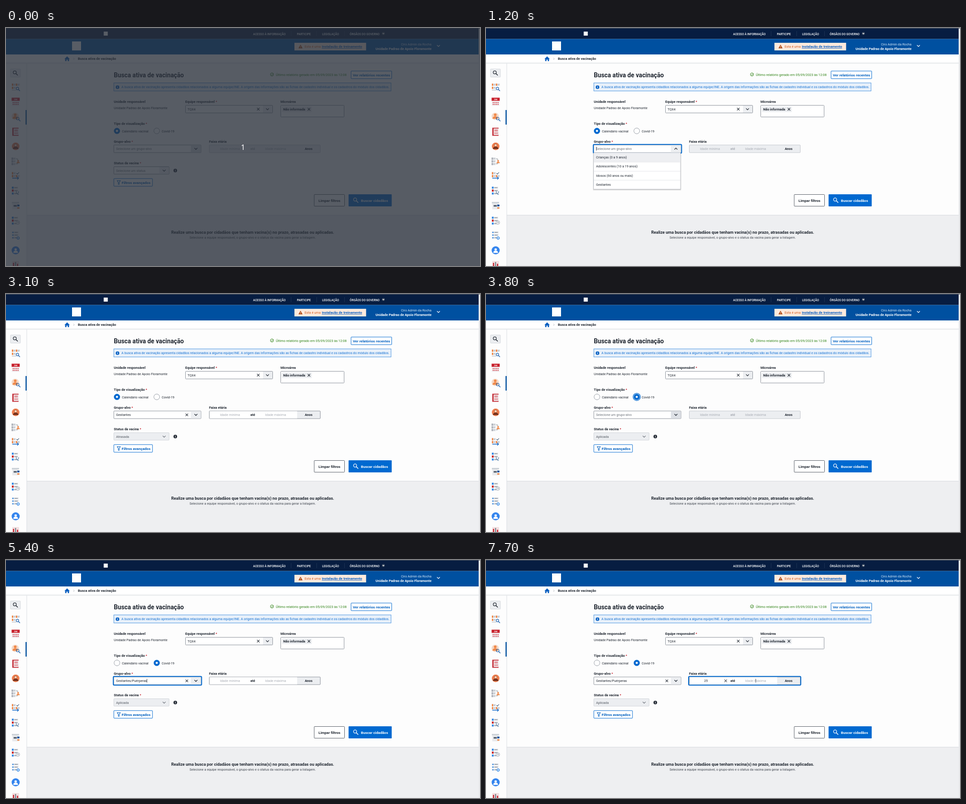
Animation of 1055 by 531 pixels, one loop 8000 ms. Source, as an HTML page:

```html
<!DOCTYPE html>
<html lang="pt-BR">
<head>
<meta charset="utf-8">
<title>Busca ativa</title>
<style>
html, body { margin: 0; width: 100%; height: 100%; overflow: hidden; background: #fdfdfd; }
svg { display: block; width: 1055px; height: 531px; }
text { font-family: Roboto, "Noto Sans", sans-serif; white-space: pre; }
</style>
</head>
<body>
<svg viewBox="0 0 1055 531"><g id="page"></g><g id="form"></g><g id="cover"></g></svg>
<script>
const BLUE = '#0069d0', INK = '#1f2630', GREY = '#6b7179', PALE = '#a9adb5', OFF = '#eceef1', RED = '#c8202c';
const SKIN = '#f08a4b', SKY = '#3d8fe6', LINE = '#b9bec6';

const rect = (x, y, w, h, fill, more = '') =>
  `<rect x="${x}" y="${y}" width="${w}" height="${h}" fill="${fill}" ${more}/>`;
const box = (x, y, w, h, fill, stroke, rx = 1, sw = 1) =>
  rect(x, y, w, h, fill, `stroke="${stroke}" stroke-width="${sw}" rx="${rx}"`);
const disc = (x, y, r, fill, more = '') => `<circle cx="${x}" cy="${y}" r="${r}" fill="${fill}" ${more}/>`;
const path = (d, stroke, w = 1, fill = 'none') =>
  `<path d="${d}" fill="${fill}" stroke="${stroke}" stroke-width="${w}"/>`;

// y is the middle of the capitals
const text = (x, y, s, { size = 7.25, color = INK, bold, anchor = 'start', more = '' } = {}) =>
  `<text x="${x}" y="${y + size * 0.36}" font-size="${size}" fill="${color}" font-weight="${bold ? 700 : 400}" text-anchor="${anchor}" ${more}>${s}</text>`;
const label = (x, y, s, required) =>
  text(x, y, s + (required ? ` <tspan fill="${RED}">*</tspan>` : ''), { size: 7.5, bold: true });
const button = (x, y, s, color) => text(x, y, s, { size: 8.1, bold: true, color });

const chevron = (x, y, color = INK, up = false, r = 3.2) => {
  const d = up ? -r / 2 : r / 2;
  return path(`M${x - r} ${y - d}L${x} ${y + d}L${x + r} ${y - d}`, color, 1.3);
};
const cross = (x, y, color = INK, r = 2.8) =>
  path(`M${x - r} ${y - r}l${2 * r} ${2 * r}m0 ${-2 * r}l${-2 * r} ${2 * r}`, color, 1.1);
const lens = (x, y, r, color, w = 1.2) =>
  disc(x, y, r, 'none', `stroke="${color}" stroke-width="${w}"`) +
  path(`M${x + r * .7} ${y + r * .7}l${r * 1.3} ${r * 1.3}`, color, w * 1.2);
const info = (x, y, color) => disc(x, y, 4, color) +
  rect(x - .6, y - .7, 1.2, 3, '#fff') + disc(x, y - 2, .7, '#fff');
const person = (x, y, r, color) => disc(x, y - r * .35, r * .38, color) +
  `<path d="M${x - r * .75} ${y + r * .75}q0 ${-r * .7} ${r * .75} ${-r * .7}t${r * .75} ${r * .7}z" fill="${color}"/>`;
const card = (x, y, color) => rect(x, y, 9, 5, '#e3e6ea') + rect(x, y, 3, 5, color) +
  rect(x + 4, y + 1.2, 4, .8, PALE) + rect(x + 4, y + 3, 3, .8, PALE);
const stack = (y, colors) => colors.map((c, i) =>
  rect(13, y - 9 + i * 6.5, 14, 4.5, '#e3e6ea') + rect(13, y - 9 + i * 6.5, 4, 4.5, c) +
  rect(18.5, y - 7.2 + i * 6.5, 7, 1, GREY)).join('');

function sidebar() {
  let s = box(10, 91.5, 22, 18, OFF, '#d3d7dc') + lens(19.5, 99, 3.4, INK, 1.3);
  s += card(13, 124, SKIN) + card(22, 124, SKIN) + card(13, 131, SKIN) + rect(13, 138, 10, 1, PALE) + lens(25.5, 135, 2.8, '#1b5fae');
  s += rect(12.5, 156, 18, 18, '#f3f4f6') + rect(12.5, 155.5, 18, 7, RED) +
    text(21.5, 159.2, 'Jan', { size: 4.5, color: '#fff', bold: true, anchor: 'middle' });
  for (let i = 0; i < 8; i++) s += rect(15 + i % 4 * 3.6, 165.5 + (i >> 2) * 4, 2, 2, RED);
  s += rect(43.5, 183, 2.5, 32.5, '#0050a0') + disc(20.5, 197, 8, '#f6d9c6') + person(20.5, 196.5, 8, SKIN) + lens(26, 202, 3, '#1b5fae');
  s += rect(14, 222.5, 14, 18, '#c5333d') + rect(17, 224.5, 12, 14, '#f4f4f5') + rect(18.5, 227, 8, 1, RED) +
    rect(18.5, 229.5, 8, 1, RED) + text(23, 234.5, 'DOC', { size: 4.4, color: RED, bold: true, anchor: 'middle' });
  s += disc(21.5, 264, 8.5, '#f08050') + person(21.5, 264, 8, '#75331f') + disc(21.5, 261.5, 2.5, '#ffd4b5');
  s += card(12.5, 289, PALE) + card(12.5, 295, PALE) + card(12.5, 301, PALE) + path('M22 292h4v3M22 303h4v-2', GREY, .8) + person(27, 298, 4.8, SKIN);
  s += card(13, 321.5, SKIN) + path('M23.5 324l2 2l3.5 -4', '#30506e', 1.1) + card(13, 328, SKIN) + card(22, 328, SKIN) +
    path('M14 335h14m-3 -3l3 3l-3 3', '#0b62c4', 1.3);
  s += stack(363, [SKY, RED, SKY]) + path('M23 364v3a2.5 2.5 0 0 0 5 0v-3M25.5 369.5q0 3 3 2', '#3d6f9e', 1);
  s += rect(13, 388, 16, 3.5, '#cdd2d8') + rect(14, 391.5, 14, 13, '#e8eaed') + rect(17, 395, 7, 3.5, '#596270') + rect(25, 394, 5, 4, '#17569f') + rect(25, 400, 5, 3, SKIN);
  s += stack(430, [SKY, RED, SKY]) + disc(26.5, 434, 4, '#eef0f3', `stroke="${PALE}"`) + path('M26.5 432v2.2h1.7', GREY, .8);
  s += [456, 462, 468].map(y => rect(13, y - 2, 15, 4, '#dfe3e9') + disc(15.5, y, 1.6, SKY) + rect(19, y - .5, 7, 1, GREY)).join('') +
    disc(27, 468.5, 2.5, '#fff', `stroke="${SKY}" stroke-width="1.7"`);
  s += disc(21.5, 496, 9, '#3585ee') + person(21.5, 496.5, 7, '#fff');
  s += rect(14, 520, 15, 11, '#f4dfe0') + rect(15.5, 524, 2.5, 7, RED) + rect(20, 522, 2.5, 9, '#7f8792') + rect(24.5, 526, 2.5, 5, RED);
  return s;
}

function header() {
  const menu = [[550, 'ACESSO À INFORMAÇÃO'], [647.5, 'PARTICIPE'], [703.5, 'LEGISLAÇÃO'], [765, 'ÓRGÃOS DO GOVERNO']];
  const unit = 'Unidade Padrao de Apoio Floramonte';
  return rect(0, 0, 1052, 24.5, '#071d41') + rect(0, 0, 1055, 1, '#555b66') +
    rect(217.5, 8, 9, 9, '#fff') +
    menu.map(([x, s]) => text(x, 13.2, s, { size: 6.4, color: '#fff', more: 'style="font-weight:500"' })).join('') +
    [634, 691, 753].map(x => rect(x, 7, .7, 11, '#28405f')).join('') +
    disc(840, 12.3, 3.2, '#3b4a60') + chevron(840, 12.3, '#fff', false, 1.7) +
    rect(0, 24.5, 1052, 34.5, '#0050a0') + rect(147, 30, 20, 20, '#fff') +
    rect(642, 33, 159.5, 17, '#fdeadd') +
    path('M655.5 37.8l4 7.2h-8z', '#b04a12', .8, '#b04a12') + rect(655.1, 40, .9, 2.5, '#fff') + rect(655.1, 43.2, .9, .9, '#fff') +
    text(664.5, 41.5, 'Esta é uma', { color: '#d2591b' }) +
    text(703, 41.5, 'Instalação de treinamento', { size: 7.65, color: '#0b5fc0', bold: true, more: 'text-decoration="underline"' }) +
    text(947, 36.3, 'Ciro Admin da Rocha', { color: '#dbe8f6', anchor: 'end' }) +
    text(947, 46.8, unit, { size: 7.45, color: '#fff', bold: true, anchor: 'end' }) +
    chevron(962.5, 39.8, '#fff') +
    rect(0, 59, 1052, 19, '#fff') + rect(0, 77.5, 1052, 1, '#d4d7db') + rect(0, 78.5, 1052, 1.5, '#f0f1f3') +
    path('M130 69.2L136 63.2L142 69.2H140.3V74H137.4V70.5H134.6V74H131.7V69.2z', 'none', 0, '#0b5fc0') +
    path('M150 66.5l2 2.2l-2 2.2', PALE, .9) +
    text(160, 68.6, 'Busca ativa de vacinação', { size: 7.5, bold: true }) +
    rect(1052, 1, 3, 530, '#e9eaec');
}

function page() {
  return rect(0, 0, 1055, 531, '#fdfdfd') +
    rect(46, 417.5, 1006, 113.5, '#eeeff1') + rect(46, 417, 1006, 1, '#d6d9de') +
    header() + rect(45.7, 79, .9, 452, '#d8dbe0') + sidebar() +
    text(240, 104.8, 'Busca ativa de vacinação', { size: 13.75, bold: true }) +
    disc(592, 103.7, 3.5, 'none', 'stroke="#2e8214"') + path('M590.3 103.7l1.4 1.5l3 -3.4', '#2e8214', 1) +
    text(600.5, 104.4, 'Último relatório gerado em 05/09/2023 às 12:08', { size: 7.35, color: '#2e8214' }) +
    box(768, 96, 90.5, 17, '#fff', BLUE) + button(772, 104.6, 'Ver relatórios recentes', '#0060c0') +
    box(240, 122.5, 617, 18, '#e7f0fa', '#4a94e0', 0) + info(248.2, 132, '#0b62c4') +
    text(257, 131.6, 'A busca ativa de vacinação apresenta cidadãos relacionados a alguma equipe/INE. A origem das informações são as fichas de cadastro individual e os cadastros do módulo dos cidadãos.', { size: 7.16, color: '#1470d2' }) +
    label(240, 164.2, 'Unidade responsável') + text(240, 178.6, 'Unidade Padrao de Apoio Floramonte', { size: 7.2 }) +
    label(399, 164.2, 'Equipe responsável', true) + box(399.5, 172.5, 194, 17, '#fff', '#8b919a') +
    rect(572, 173, 21, 16, OFF) + text(404, 181.2, 'TQX4') + cross(561.5, 181) + chevron(582, 181) +
    label(611, 164.2, 'Microárea') + box(611.5, 172.5, 141, 26, '#fff', '#8b919a') +
    rect(614.5, 175, 66, 12.5, OFF) + text(617, 181.2, 'Não informada', { size: 7.35, bold: true }) + cross(674.3, 181.2) +
    label(240, 212.8, 'Tipo de visualização', true) +
    text(258, 230, 'Calendário vacinal') + text(346.5, 230, 'Covid-19') +
    label(240, 252.8, 'Grupo-alvo', true) + label(452, 252.8, 'Faixa etária') +
    label(240, 301.3, 'Status da vacina', true) +
    box(240, 336, 86, 17, '#fff', BLUE) + path('M247.5 340.5h7l-2.5 4v4.2h-2v-4.2z', '#0060c0', 1.1) +
    button(257.5, 344.8, 'Filtros avançados', '#0060c0') +
    box(686, 371.5, 67.5, 26, '#fff', '#555b64') + button(695.5, 384.6, 'Limpar filtros', INK) +
    rect(762.5, 371, 96, 27, BLUE, 'rx="1"') + lens(777, 382.7, 3.5, '#fff', 1.3) + button(790, 384.6, 'Buscar cidadãos', '#fff') +
    text(549, 456, 'Realize uma busca por cidadãos que tenham vacina(s) no prazo, atrasadas ou aplicadas.', { size: 9.14, bold: true, anchor: 'middle' }) +
    text(549, 467.8, 'Selecione a equipe responsável, o grupo-alvo e o status da vacina para gerar a listagem.', { size: 7.23, color: '#3e444d', anchor: 'middle' });
}

const ROUTINE = ['Crianças (0 a 9 anos)', 'Adolescentes (10 a 19 anos)', 'Idosos (60 anos ou mais)', 'Gestantes'];
const COVID = ['Crianças (5 a 11 anos)', 'Adolescentes (12 a 17 anos)', 'Adultos (18 a 59 anos)', 'Idosos (60 anos ou mais)', 'Gestantes/Puérperas'];
const within = (t, a, b) => t >= a && t < b;
const caret = x => rect(x, 265, .8, 8.5, INK);
const ring = (x, w, soft) => box(x, 259.7, w, 19.6, 'none', BLUE, 2, 2).replace('/>', ` opacity="${soft ? .5 : 1}"/>`);

function radio(x, on, halo) {
  return disc(x, 229.6, 6.4, on ? BLUE : '#fff', `stroke="${on ? BLUE : '#8b919a'}" stroke-width=".9"`) +
    (on ? disc(x, 229.6, 2.4, '#fff') : '') +
    (halo ? disc(x, 229.6, 8.2, 'none', `stroke="${BLUE}" stroke-width="1.3"`) : '');
}

function group(t, value, open) {
  const focus = within(t, 700, 3100) || within(t, 4100, 6500);
  const hover = t < 700 || within(t, 3800, 4100);
  const start = t < 1900 ? 700 : t < 4100 ? 1900 : t < 5400 ? 4100 : 5400;
  const blink = open ? t - start < 550 : Math.floor((t - start) / 550) % 2 === 0;
  return box(240, 261, 194, 17, '#fff', '#8b919a') +
    rect(411.5, 261.5, 22, 16, hover ? '#dde0e5' : OFF) +
    text(245, 269.3, value || 'Selecione um grupo-alvo', { color: value ? INK : GREY }) +
    (value ? cross(402.5, 269.6) : '') + chevron(422.7, 269.4, INK, open) +
    (focus ? ring(238.8, 196.6, t === 700 || t === 4100) : '') +
    (focus && blink ? caret(!value ? 245 : value.length > 9 ? 313.4 : 277.4) : '');
}

function ages(t, enabled) {
  const focus = t >= 6500, typed = t < 6900 ? '' : t < 7000 ? '2' : '25';
  const hint = (x, s) => text(x, 269.8, s, { color: PALE, anchor: 'middle', size: 7.35 });
  return box(452.5, 261, 247, 17, OFF, enabled ? '#8b919a' : '#c3c7cd') +
    (enabled ? rect(453, 261.5, 195, 16, '#fff') : '') +
    (typed ? text(489.5, 269.6, typed, { anchor: 'middle' }) + cross(533.5, 269.5, within(t, 7200, 7600) ? '#000' : '#3c424b')
           : hint(498.5, 'Idade mínima')) +
    text(549.3, 269.6, 'até', { size: 7.5, bold: true, color: enabled ? INK : PALE, anchor: 'middle' }) +
    hint(600, 'Idade máxima') +
    text(673.5, 269.6, 'Anos', { size: 7.5, bold: true, anchor: 'middle' }) +
    (focus ? ring(451, 249.6, t === 6500) : '') +
    (within(t, 6600, 6900) ? caret(498) : '') + (t >= 7600 ? caret(600) : '');
}

function status(t) {
  const value = t < 1900 ? '' : t < 3200 ? 'Atrasada' : 'Aplicada';
  return box(240, 309.5, 123, 16.5, value ? OFF : '#fff', value ? '#d0d4d9' : '#8b919a') +
    (value ? '' : rect(341, 310, 21.5, 15.5, OFF)) +
    text(245, 317.9, value || 'Selecione um status', { color: value ? '#525861' : GREY }) +
    chevron(352, 318, value ? GREY : INK) + info(376.8, 318, within(t, 2300, 2500) ? '#0b62c4' : INK);
}

function list(items, active, opacity) {
  const x = 239.5, y = 278.5, w = 193.5, row = 20.25, h = row * items.length;
  return `<g opacity="${opacity}">` +
    [3, 2, 1].map(i => rect(x - i / 2, y, w + i, h + i, '#000', 'opacity=".08" rx="1"')).join('') +
    box(x, y, w, h, '#fff', LINE, 1, .7) +
    items.map((s, i) => (i === active ? rect(x + .5, y + i * row, w - 1, row, '#eeeff2') : '') +
      (i ? rect(x, y + i * row, w, .7, '#d9dce1') : '') +
      text(245, y + (i + .5) * row, s)).join('') + '</g>';
}

function form(t) {
  const covid = t >= 3200;
  const open = within(t, 700, 1900) || within(t, 4100, 5400);
  const value = within(t, 1900, 3200) ? 'Gestantes' : t >= 5400 ? 'Gestantes/Puérperas' : '';
  let s = radio(247, !covid) + radio(335.5, covid, within(t, 3300, 4100)) +
    group(t, value, open) + ages(t, value !== '') + status(t);
  if (within(t, 700, 2000)) {
    const active = Math.min(3, Math.max(0, (t - 1200) / 100));
    s += list(ROUTINE, active, t === 700 || t === 1900 ? .5 : 1);
  } else if (open) {
    const active = Math.min(4, Math.max(0, (t - 4400) / 100));
    s += list(COVID, active, t === 4100 ? .5 : 1);
  }
  return s;
}

const $ = id => document.getElementById(id);
$('page').innerHTML = page();
$('cover').innerHTML = rect(0, 0, 1055, 531, '#2a303a', 'opacity=".78"') +
  text(527.5, 266, '1', { size: 16.5, color: '#fff', anchor: 'middle', more: 'style="font-family:\'Noto Sans\',sans-serif"' });

let shown = -1;
function draw() {
  const t = Math.floor(performance.now() % 8000 / 100) * 100;
  if (t !== shown) {
    shown = t;
    $('form').innerHTML = form(t);
    $('cover').style.display = t < 100 ? '' : 'none';
  }
  requestAnimationFrame(draw);
}
draw();
</script>
</body>
</html>
```
